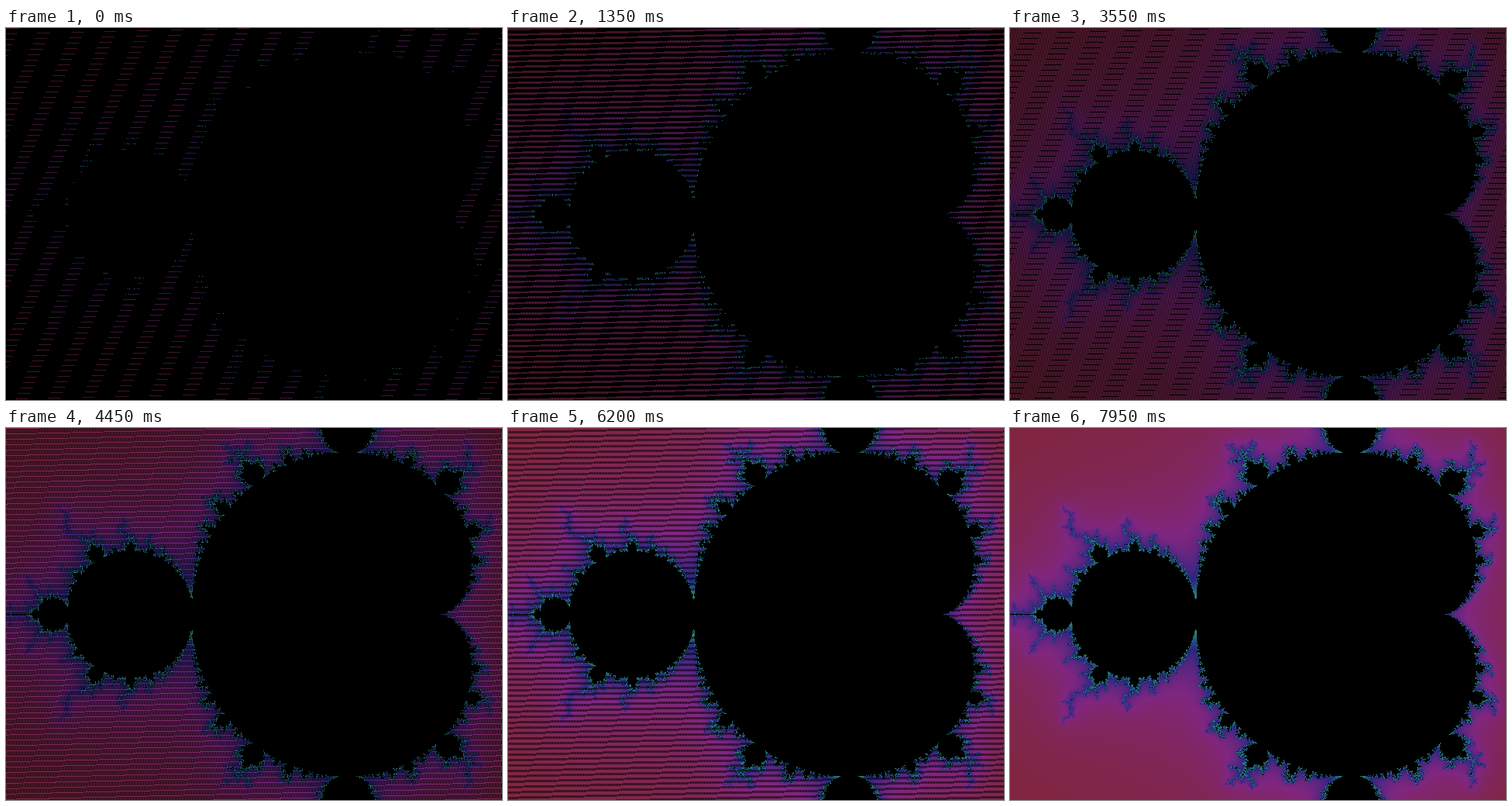
Animation of 640x480 px, one loop 8000 ms. Source, as an HTML page with a canvas:

```html
<!DOCTYPE html>
<html lang="en">
<head>
<meta charset="utf-8">
<title>Mandelbrot fill</title>
<style>
  html, body { margin: 0; width: 100%; height: 100%; overflow: hidden; background: #000; }
  canvas { display: block; width: 640px; height: 480px; image-rendering: pixelated; }
</style>
</head>
<body>
<canvas id="stage" width="640" height="480"></canvas>
<script>
const W = 640, H = 480, SCALE = 320;
const LIMIT = 50;
const LOOP = 8000, STEP = 50;
const START = 0.027, RATE = 0.00612;   // share of pixels shown, growth per step
const STRIDE = 0.5 + 0.5 / 298.47;     // rank advance from one pixel to the next
const BLACK = 0xff000000;

const ctx = document.getElementById('stage').getContext('2d');
const image = ctx.createImageData(W, H);
const pixels = new Uint32Array(image.data.buffer);
const colors = new Uint32Array(W * H);
const ranks = new Float64Array(W * H);

// Smooth escape count, or -1 inside the set
function escape(cx, cy) {
  let x = 0, y = 0;
  for (let n = 1; n <= LIMIT; n++) {
    const nx = x * x - y * y + cx;
    y = 2 * x * y + cy;
    x = nx;
    const r2 = x * x + y * y;
    if (r2 > 64) return n + 1 - Math.log2(Math.log(r2) / 2);
  }
  return -1;
}

function hsv(h, s, v) {
  const channel = n => {
    const k = (((n + h / 60) % 6) + 6) % 6;
    return Math.round(255 * v * (1 - s * Math.max(0, Math.min(k, 4 - k, 1))));
  };
  return (BLACK | channel(1) << 16 | channel(3) << 8 | channel(5)) >>> 0;
}

for (let i = 0; i < W * H; i++) {
  const x = i % W, y = Math.floor(i / W);
  const n = escape(x / SCALE - 1.5, (y - H / 2) / SCALE);
  colors[i] = n < 0 ? BLACK : hsv(416 - 265 * Math.sqrt(n / LIMIT), 0.7, 0.5);
  ranks[i] = (i * STRIDE) % 1;
}

let shown = -1;

function draw(time) {
  const step = Math.floor((time % LOOP) / STEP);
  if (step === shown) return;
  shown = step;
  const level = START + RATE * step;
  for (let i = 0; i < pixels.length; i++) {
    pixels[i] = ranks[i] < level ? colors[i] : BLACK;
  }
  ctx.putImageData(image, 0, 0);
}

const origin = performance.now();

function tick() {
  draw(performance.now() - origin);
  requestAnimationFrame(tick);
}
tick();
</script>
</body>
</html>
```
